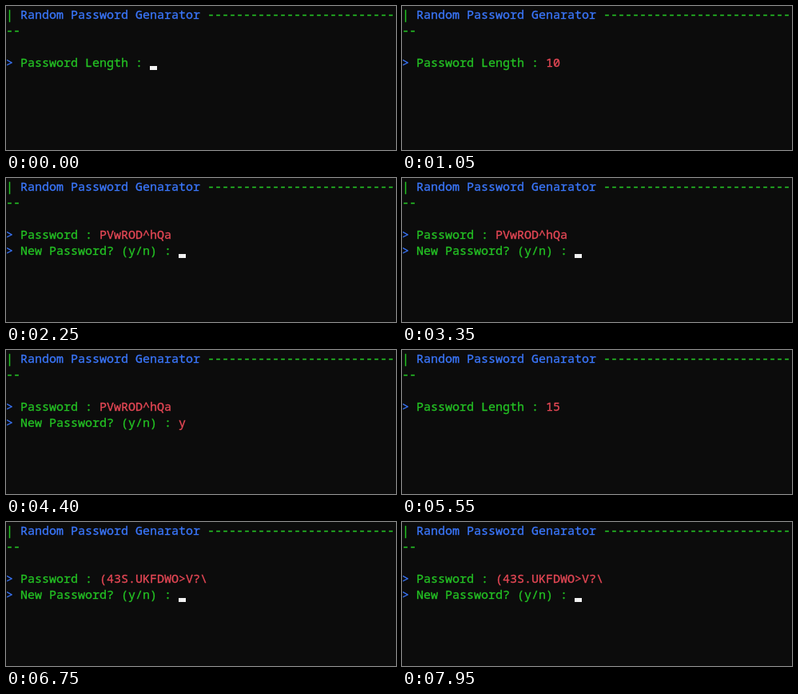
Recreate the animation shown at these times as an HTML page. Size 488 px wide and 180 px high, loop 8000 ms.

```html
<!DOCTYPE html>
<html lang="en">
<head>
<meta charset="utf-8">
<title>Password generator</title>
<style>
  html, body { margin: 0; width: 100%; height: 100%; overflow: hidden; background: #0c0c0c; }
  #screen {
    position: relative; width: 488px; height: 180px; margin: 0; overflow: hidden;
    font: 15px/20px "Noto Sans Mono", "DejaVu Sans Mono", monospace;
    font-variant-ligatures: none; color: #24c424;
    -webkit-text-stroke: .3px currentColor;
  }
  .row { position: absolute; left: 0; height: 20px; white-space: pre; }
  .blue { color: #3b78ff; }
  .red { color: #e74856; }
  #cursor { position: absolute; width: 9px; height: 5px; background: #f2f2f2; }
</style>
</head>
<body>
<div id="screen">
  <div class="row" style="top:0">| <span class="blue">Random Password Genarator</span> --------------------------</div>
  <div class="row" style="top:20px">--</div>
  <div class="row" style="top:60px"><span class="blue">&gt;</span> <span id="label"></span><span class="red" id="value"></span></div>
  <div class="row" id="question" style="top:80px"><span class="blue">&gt;</span> New Password? (y/n) : <span class="red" id="answer"></span></div>
  <div id="cursor"></div>
</div>
<script>
const LOOP = 8000, BLINK = 1065, CELL = 9, ROW = 20;
const el = id => document.getElementById(id);
const [label, value, question, answer, cursor] =
  ['label', 'value', 'question', 'answer', 'cursor'].map(el);

const askLength = (at, typed = '') =>
  ({ at, label: 'Password Length : ', value: typed, row: 3, col: 20, idle: !typed });
const showPassword = (at, password, reply = '') =>
  ({ at, label: 'Password : ', value: password, reply, row: 4, col: 24, idle: !reply });

const scenes = [
  askLength(0),
  askLength(600, '1'),
  askLength(750, '10'),
  showPassword(1200, 'PVwROD^hQa'),
  showPassword(4050, 'PVwROD^hQa', 'y'),
  askLength(4700),
  askLength(5250, '1'),
  askLength(5400, '15'),
  showPassword(6150, '(43S.UKFDWO>V?\\')
];

let current;
function show(scene) {
  current = scene;
  label.textContent = scene.label;
  value.textContent = scene.value;
  answer.textContent = scene.reply || '';
  question.style.visibility = scene.row === 4 ? 'visible' : 'hidden';
  cursor.style.left = scene.col * CELL + 'px';
  cursor.style.top = scene.row * ROW + 15 + 'px';
}

const start = performance.now();
function draw(now) {
  const t = Math.max(0, now - start) % LOOP;
  const scene = scenes.findLast(s => s.at <= t);
  if (scene !== current) show(scene);
  const lit = scene.idle && t % BLINK < BLINK / 2;
  cursor.style.visibility = lit ? 'visible' : 'hidden';
  requestAnimationFrame(draw);
}
draw(start);
</script>
</body>
</html>
```
